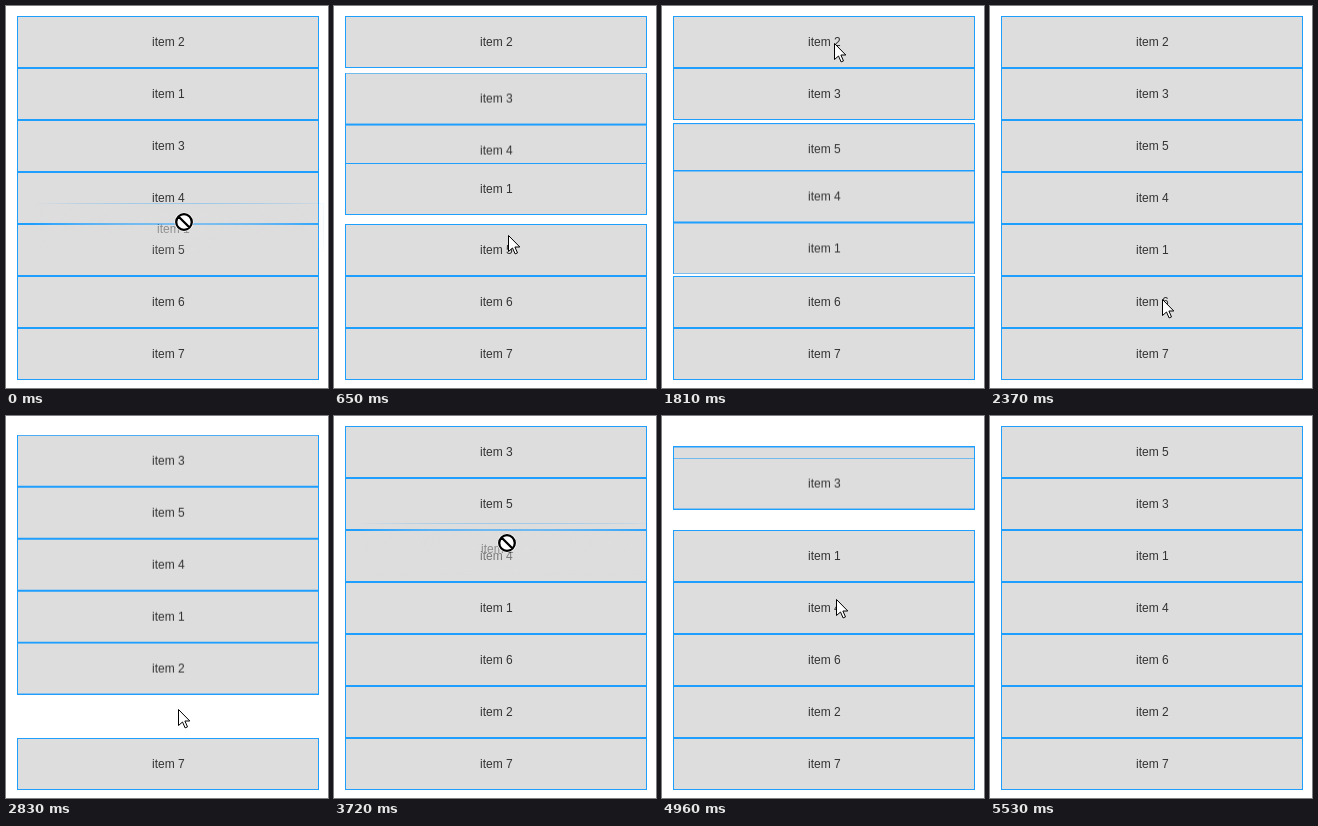
Recreate the animation shown at these times as an HTML page with a canvas. Size 322 px wide and 382 px high, loop 5.56 s.

```html
<!DOCTYPE html>
<html lang="en">
<head>
<meta charset="utf-8">
<title>Sortable list</title>
<style>
  html, body { margin: 0; width: 100%; height: 100%; overflow: hidden; background: #fff; }
  canvas { display: block; width: 322px; height: 382px; }
</style>
</head>
<body>
<canvas id="stage" width="322" height="382"></canvas>
<script>
const ctx = document.getElementById('stage').getContext('2d');
const LOOP = 5560, SLIDE = 800, DELAY = 40, HOLD = 95;
const LEFT = 11, TOP = 10, W = 302, H = 52;
const slotY = i => TOP + i * H;

// Each drag: item, new index, time and point of grab and drop, rest afterwards.
const drags = [
  { item: 1, to: 3, grab: [-400, 173, 81], drop: [95, 178, 216], rest: 250 },
  { item: 5, to: 2, grab: [860, 172, 236], drop: [1147, 169, 144], rest: 260 },
  { item: 2, to: 5, grab: [1830, 172, 36], drop: [2365, 172, 293], rest: 480 },
  { item: 1, to: 2, grab: [3470, 172, 186], drop: [3814, 173, 127], rest: 100 },
  { item: 5, to: 0, grab: [4440, 172, 86], drop: [4640, 175, 34], rest: 60 }
];
const EXIT = [5280, 172, 384];

let list = [2, 1, 3, 4, 5, 6, 7];
drags.forEach((d, i) => {
  d.before = list;
  d.after = list = list.filter(n => n !== d.item);
  list.splice(d.to, 0, d.item);
  d.next = i + 1 < drags.length ? drags[i + 1].grab : EXIT;
});

const bez = (a, b, s) => 3 * a * s * (1 - s) ** 2 + 3 * b * s * s * (1 - s) + s ** 3;

// cubic-bezier(.25, .1, .25, 1)
function ease(p) {
  if (p <= 0 || p >= 1) return Math.min(1, Math.max(0, p));
  let lo = 0, hi = 1;
  for (let i = 0; i < 24; i++) {
    const mid = (lo + hi) / 2;
    if (bez(.25, .25, mid) < p) lo = mid; else hi = mid;
  }
  return bez(.1, 1, lo);
}

function glide(t, t0, t1, [, x0, y0], [, x1, y1]) {
  const p = Math.min(1, Math.max(0, (t - t0) / (t1 - t0)));
  const s = p * p * (3 - 2 * p);
  return [Math.round(x0 + (x1 - x0) * s), Math.round(y0 + (y1 - y0) * s)];
}

function pointer(t, { grab, drop, rest, next }) {
  return t < drop[0]
    ? glide(t, grab[0], drop[0] - HOLD, grab, drop)
    : glide(t, drop[0] + rest, next[0], drop, next);
}

function layout(t, { before, after, drop }) {
  const p = ease((t - drop[0] - DELAY) / SLIDE);
  return after.map((item, i) => {
    const from = slotY(before.indexOf(item)), to = slotY(i);
    return { item, y: from + (to - from) * p, moving: p > 0 && p < 1 && from !== to };
  });
}

function makeCanvas() {
  const c = document.createElement('canvas');
  c.width = W;
  c.height = H;
  return c;
}

const sprites = {};
for (const item of list) {
  const c = sprites[item] = makeCanvas(), g = c.getContext('2d');
  g.fillStyle = '#1e9fff';
  g.fillRect(0, 0, W, H);
  g.fillStyle = '#ddd';
  g.fillRect(1, 1, W - 2, H - 2);
  g.fillStyle = '#333';
  g.font = '12px "Liberation Sans", Arial, sans-serif';
  g.fillText('item ' + item, 135, 30);
}

const ghost = makeCanvas(), gctx = ghost.getContext('2d');

// Masks with 1 - d² along the line.
function fade(x0, y0, x1, y1) {
  const g = gctx.createLinearGradient(x0, y0, x1, y1);
  for (let d = -1; d <= 1; d += .125) g.addColorStop((d + 1) / 2, `rgba(0,0,0,${1 - d * d})`);
  gctx.globalCompositeOperation = 'destination-in';
  gctx.fillStyle = g;
  gctx.fillRect(0, 0, W, H);
}

// The drag image is strongest under the pointer and fades outwards.
function drawGhost({ item, before, grab }, x, y) {
  const px = grab[1] - LEFT, py = grab[2] - slotY(before.indexOf(item));
  gctx.globalCompositeOperation = 'copy';
  gctx.drawImage(sprites[item], 0, 0);
  fade(px - 150, 0, px + 150, 0);
  fade(0, py - 32, 0, py + 32);
  ctx.globalAlpha = .5;
  ctx.drawImage(ghost, x - px, y - py);
  ctx.globalAlpha = 1;
}

function drawBlocked(x, y) {
  const d = 5.3;
  ctx.beginPath();
  ctx.arc(x, y, 9.6, 0, Math.PI * 2);
  ctx.fillStyle = '#fff';
  ctx.fill();
  ctx.beginPath();
  ctx.arc(x, y, 7.8, 0, Math.PI * 2);
  ctx.moveTo(x - d, y - d);
  ctx.lineTo(x + d, y + d);
  ctx.strokeStyle = '#000';
  ctx.lineWidth = 2.3;
  ctx.stroke();
}

const arrow = new Path2D('M.5 .5v16l4-3.5 2.6 5.9 2.4-1-2.6-5.9h4.9z');

function drawArrow(x, y) {
  ctx.save();
  ctx.translate(x, y);
  ctx.fillStyle = '#fff';
  ctx.fill(arrow);
  ctx.strokeStyle = '#000';
  ctx.lineWidth = 1;
  ctx.stroke(arrow);
  ctx.restore();
}

function draw(t) {
  ctx.fillStyle = '#fff';
  ctx.fillRect(0, 0, 322, 382);
  const drag = drags.filter(d => t >= d.grab[0]).pop();
  // A slide may outlast the next grab, so rows follow the latest drop.
  const last = drags.filter(d => t >= d.drop[0] + DELAY).pop();
  const rows = layout(t, last || drags[0]);
  for (const moving of [false, true]) {
    for (const r of rows) if (r.moving === moving) ctx.drawImage(sprites[r.item], LEFT, r.y);
  }
  const [x, y] = pointer(t, drag);
  if (t < drag.drop[0]) {
    drawGhost(drag, x, y);
    drawBlocked(x, y);
  } else {
    drawArrow(x, y);
  }
}

const begin = performance.now();
function tick() {
  draw((performance.now() - begin) % LOOP);
  requestAnimationFrame(tick);
}
tick();
</script>
</body>
</html>
```
